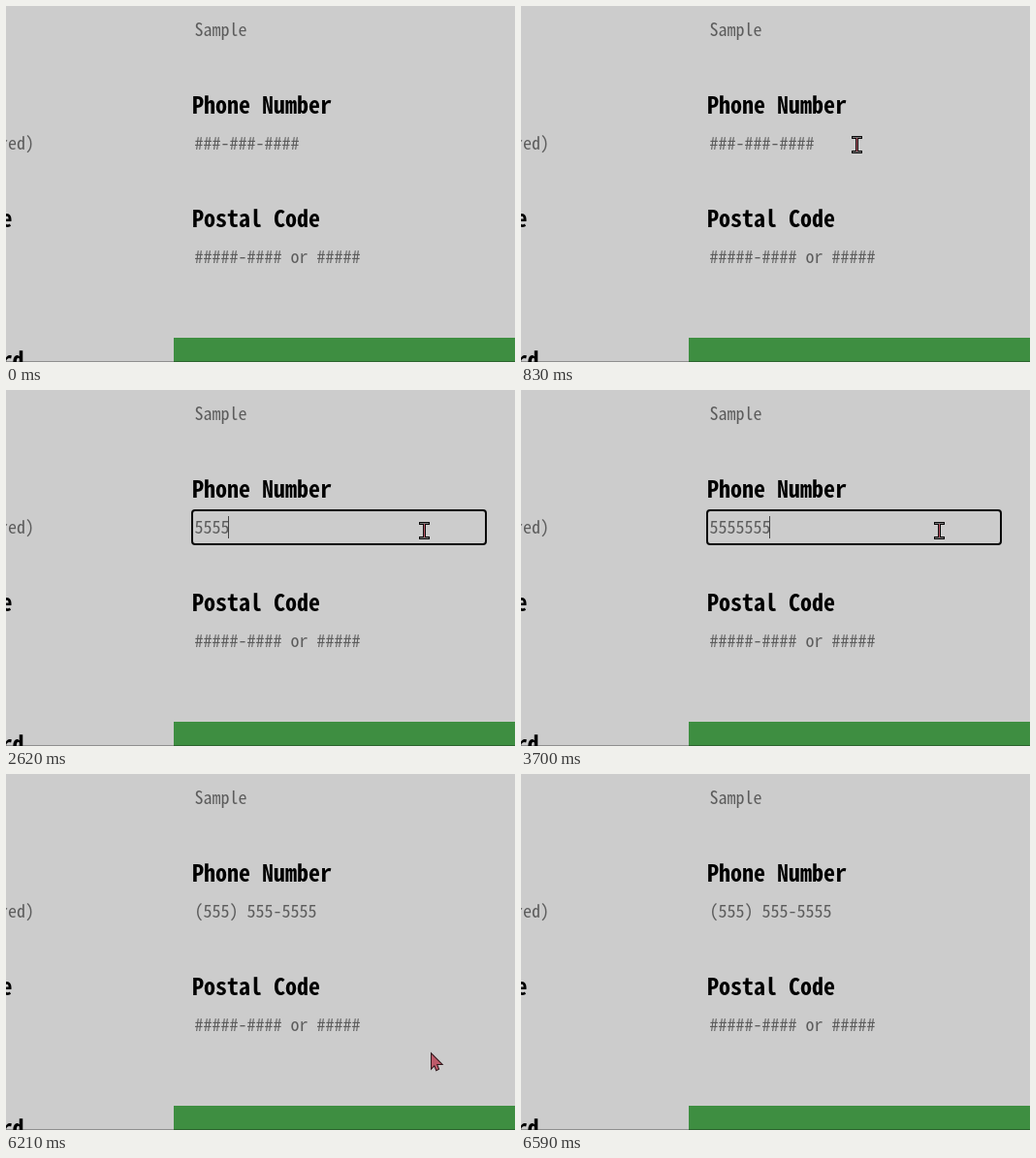
An HTML page with a canvas that plays this animation: 525 by 367 pixels, repeating every 6970 ms.

```html
<!DOCTYPE html>
<html lang="en">
<head>
<meta charset="utf-8">
<title>Phone number field</title>
<style>
  html, body { margin: 0; width: 100%; height: 100%; overflow: hidden; background: #ccc; }
  canvas { display: block; }
</style>
</head>
<body>
<canvas id="stage" width="525" height="367"></canvas>
<script>
const ctx = document.getElementById('stage').getContext('2d');
const LOOP = 6970, TICK = 76;
const FONT = '"Noto Sans Mono CJK JP", "Noto Sans Mono CJK SC", "Noto Sans Mono", monospace';
const GREY = '#5c5c5c', INK = '#0a0a0a', PINK = '#bd5a69', OUTLINE = '#30181c';

const FOCUS = 910, CARET_OFF = 1440, BLUR = 4970;
const keyTimes = [1840, 2010, 2160, 2620, 2790, 3250, 3700, 3870, 4270, 4490];
const DIGIT = '5';

// Each glide starts where the one before it ended
const entry = { x: 427, y: 341 };
const glides = [
  { from: 70, to: 360, x: 239, y: 147 },
  { from: 450, to: 610, x: 224, y: 140 },
  { from: 610, to: 990, x: 431, y: 145 },
  { from: 5880, to: 6040, x: 381, y: 186 },
  { from: 6130, to: 6290, x: 462, y: 330 },
  { from: 6360, to: 6590, x: 476, y: 374 }
];

// Pointer position, moved in even ticks along an ease-out
function pointerAt(t) {
  const i = glides.findLastIndex(g => g.from <= t);
  if (i < 0) return null;
  const goal = glides[i], origin = glides[i - 1] || entry;
  const span = goal.to - goal.from, steps = Math.round(span / TICK);
  const p = Math.min(1, Math.floor((t - goal.from) / span * steps) / steps);
  const ease = Math.sin(p * Math.PI / 2);
  const x = Math.round(origin.x + (goal.x - origin.x) * ease);
  const y = Math.round(origin.y + (goal.y - origin.y) * ease);
  const kind = y < 160 ? 'beam' : y < 342 ? 'arrow' : 'hand';
  return y < 374 ? { x, y, kind } : null;
}

function rect(color, x, y, w, h) {
  ctx.fillStyle = color;
  ctx.fillRect(x, y, w, h);
}

// Monospaced text on a fixed pitch
function text(str, x, y, bold) {
  const pitch = bold ? 12 : 9;
  ctx.font = `${bold ? 700 : 400} ${pitch * 2}px ${FONT}`;
  ctx.letterSpacing = '0px';
  ctx.letterSpacing = pitch - ctx.measureText('0').width + 'px';
  ctx.fillStyle = bold ? '#000' : GREY;
  ctx.fillText(str, x, y);
}

function outlined(path) {
  ctx.lineWidth = 2;
  ctx.strokeStyle = OUTLINE;
  ctx.fillStyle = PINK;
  ctx.stroke(path);
  ctx.fill(path);
}

const cursors = {
  beam() {
    for (const y of [-9, 6]) {
      rect(INK, -5, y, 11, 3);
      rect('#777', -4, y + 1, 9, 1);
    }
    rect(INK, -1, -7, 3, 14);
    rect(PINK, 0, -7, 1, 14);
  },
  arrow() {
    outlined(new Path2D('M1 1V15L4 12L6 17L8 16L6 11H11Z'));
  },
  hand() {
    const hand = new Path2D();
    hand.roundRect(0, 1, 2, 10, 1);
    hand.roundRect(-3, 7, 13, 12, 3);
    outlined(hand);
    for (const x of [3, 6]) rect(OUTLINE, x, 7, 1, 4);
  }
};

function drawField(t) {
  const typed = keyTimes.filter(k => k <= t).length;
  let value = typed ? DIGIT.repeat(typed) : '###-###-####';
  if (t >= BLUR) value = value.replace(/^(...)(...)/, '($1) $2-');
  text(value, 194.5, 148);

  if (t < FOCUS || t >= BLUR) return;
  ctx.strokeStyle = INK;
  ctx.lineWidth = 2;
  ctx.beginPath();
  ctx.roundRect(192, 124, 303, 35, 3);
  ctx.stroke();
  if (typed || t < CARET_OFF) rect('#444', Math.max(194, 193 + 9 * typed), 130, 1, 23);
}

function drawPage(hover) {
  rect('#ccc', 0, 0, 525, 367);
  text('Sample', 194.5, 31);
  text('Phone Number', 192, 110.5, true);
  text('Postal Code', 192, 227.5, true);
  text('#####-#### or #####', 194.5, 264.5);
  text('red)', -7, 148);
  text('e', -5.5, 227.5, true);
  text('rd', -5.5, 374, true);
  rect(hover ? '#126f1a' : '#3e8e41', 173, 342, 352, 25);
  rect('rgba(0,0,0,.3)', 0, 366, 525, 1);
}

function drawPointer({ x, y, kind }) {
  ctx.save();
  ctx.translate(x, y);
  cursors[kind]();
  ctx.restore();
}

const start = performance.now();
function frame() {
  const t = (performance.now() - start) % LOOP;
  const pointer = pointerAt(t);
  drawPage(pointer?.kind === 'hand');
  drawField(t);
  if (pointer) drawPointer(pointer);
  requestAnimationFrame(frame);
}
frame();
</script>
</body>
</html>
```
